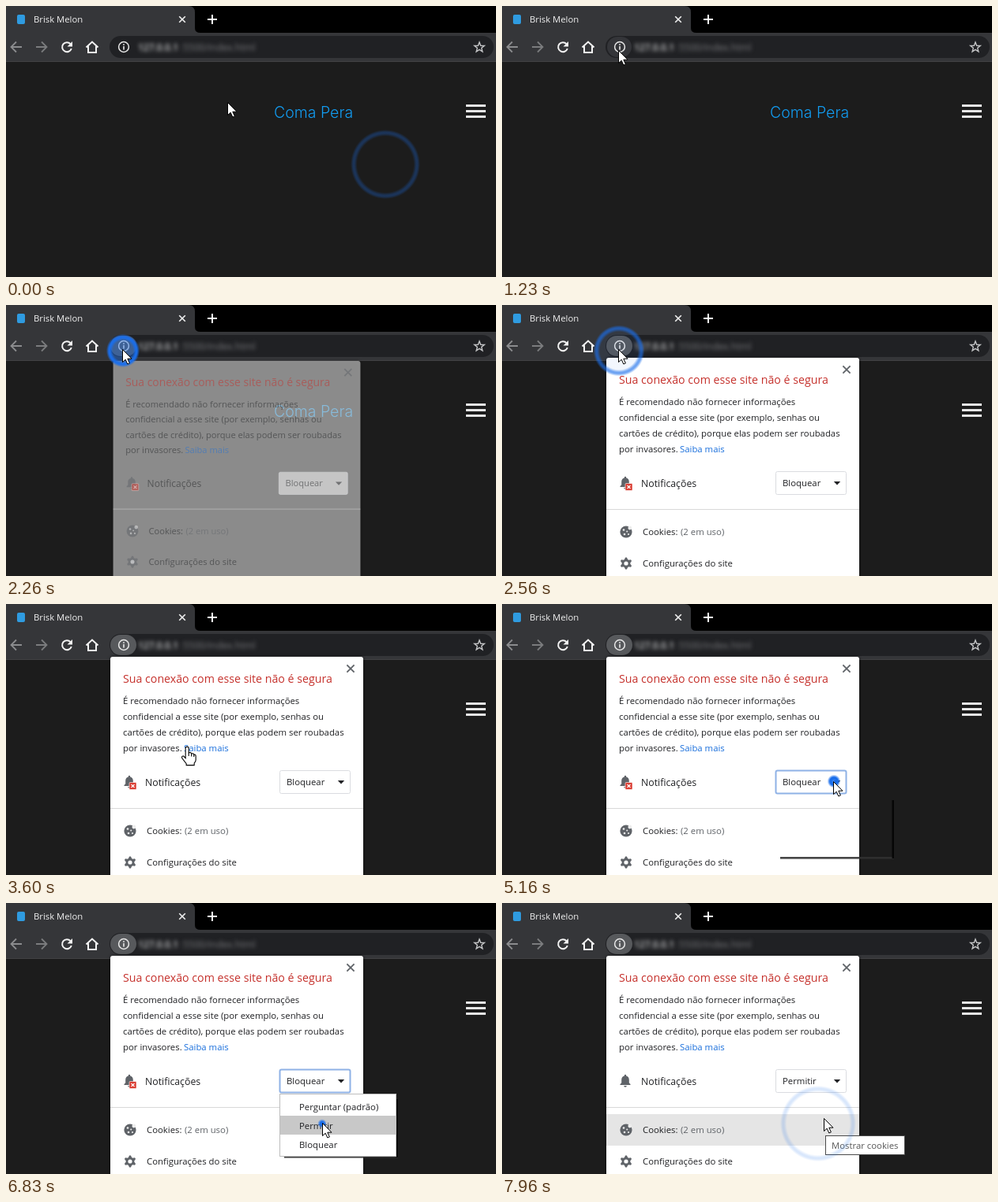
An HTML page with a canvas that plays this animation: 620x344 px, repeating every 8 s.

```html
<!DOCTYPE html>
<html lang="pt">
<head>
<meta charset="utf-8">
<title>Site permissions</title>
<style>
html, body { margin: 0; width: 620px; height: 344px; overflow: hidden; background: #1c1c1c; }
canvas { display: block; }
</style>
</head>
<body>
<canvas id="stage" width="620" height="344"></canvas>
<script>
const ctx = document.getElementById('stage').getContext('2d');
const LOOP = 8000, TAU = Math.PI * 2;
const UI = '"Open Sans", "Noto Sans", sans-serif';
const GREY = '#5f6368', INK = '#202124', BAR = '#353639';

// Pointer tip: time, x, y
const PATH = [
  [0, 280, 122], [100, 278, 121], [350, 240, 104], [600, 190, 76], [860, 157, 61],
  [1060, 148, 57], [1230, 147, 56], [2850, 147, 56], [3150, 172, 98], [3480, 212, 161],
  [3600, 229, 181], [3900, 275, 205], [4300, 341, 222], [4700, 407, 225], [4900, 419, 225],
  [5750, 419, 225], [6000, 412, 245], [6250, 402, 274], [6360, 400, 279],
  [7050, 400, 279], [7400, 407, 273], [LOOP, 407, 273]
];
const CLICKS = [[-1040, 480, 201], [1830, 148, 58], [5070, 420, 225], [6810, 400, 280]];
const POPUP = 2160, MENU = 5150, CHOICE = 6960, TOOLTIP = 7800;

const clamp = v => Math.max(0, Math.min(1, v));
const ramp = (t, start, length) => clamp((t - start) / length);

function pointer(t) {
  const i = PATH.findIndex(p => p[0] > t);
  const [t0, x0, y0] = PATH[i - 1], [t1, x1, y1] = PATH[i];
  const k = (t - t0) / (t1 - t0);
  return [x0 + (x1 - x0) * k, y0 + (y1 - y0) * k];
}

function text(str, x, y, size = 11.35, color = INK, weight = 400, family = UI) {
  ctx.font = `${weight} ${size}px ${family}`;
  ctx.fillStyle = color;
  ctx.fillText(str, x, y);
}

function rect(x, y, w, h, color) {
  ctx.fillStyle = color;
  ctx.fillRect(x, y, w, h);
}

function round(x, y, w, h, r, fill, stroke, width = 1) {
  ctx.beginPath();
  ctx.roundRect(x, y, w, h, r);
  paint(undefined, fill, stroke, width);
}

function paint(path, fill, stroke, width) {
  const args = path ? [path] : [];
  if (fill) { ctx.fillStyle = fill; ctx.fill(...args); }
  if (stroke) { ctx.strokeStyle = stroke; ctx.lineWidth = width; ctx.stroke(...args); }
}

function shape(x, y, d, fill, stroke, width = 1) {
  ctx.save();
  ctx.translate(x, y);
  paint(new Path2D(d), fill, stroke, width);
  ctx.restore();
}

function disc(x, y, r, fill, stroke, width) {
  ctx.beginPath();
  ctx.arc(x, y, r, 0, TAU);
  paint(undefined, fill, stroke, width);
}

// Closed radial outline; radius is chosen by vertex index
function radial(n, radius, turn = -Math.PI / 2) {
  let d = '';
  for (let i = 0; i < n; i++) {
    const a = turn + i * TAU / n, r = radius(i);
    d += `${i ? 'L' : 'M'}${r * Math.cos(a)} ${r * Math.sin(a)}`;
  }
  return d + 'Z';
}

const STAR = radial(10, i => i % 2 ? 2.8 : 6.6);
const GEAR = radial(24, i => i % 4 < 2 ? 7.6 : 5.4, -Math.PI / 2 - TAU / 48);
const cross = r => `M${-r} ${-r}L${r} ${r}M${r} ${-r}L${-r} ${r}`;

function browser(t, x) {
  rect(0, 0, 620, 344, '#1c1c1c');
  rect(0, 0, 620, 35, '#000');
  rect(0, 34, 620, 36, BAR);
  rect(0, 70, 620, 1, '#424244');
  shape(0, 0, 'M0 0H231Q239 0 239 8V28Q239 34 246 34H0Z', BAR);

  round(14, 11, 10, 12, 2, '#2f9be0');
  text('Brisk Melon', 35, 21, 11.3, '#f1f1f1');
  shape(223, 17, cross(3.8), null, '#f1f1f1', 1.6);
  shape(261, 17, 'M-6 0H6M0 -6V6', null, '#fff', 2);

  const arrow = 'M7 0H-6M0 -6.5L-6.5 0L0 6.5';
  shape(13, 52, arrow, null, '#8b8c8e', 1.8);
  ctx.save();
  ctx.scale(-1, 1);
  shape(-45, 52, arrow, null, '#7b7c7e', 1.8);
  ctx.restore();
  shape(77, 52, 'M4.6 -3.8A6 6 0 1 0 5.8 2', null, '#f4f4f4', 2);
  shape(77, 52, 'M7 -7V-.5H.5Z', '#f4f4f4');
  shape(109, 52, 'M-7.5 .5L0 -6.5L7.5 .5M-5 -1V7H5V-1', null, '#f4f4f4', 2);

  round(131, 38, 486, 28, 14, '#202124');
  if (t >= POPUP) round(132, 39, 33, 26, 13, '#57595c');
  else if (t > 800 && x < 165) round(133, 39, 31, 26, 13, '#343539');
  disc(149, 52, 6.4, null, '#e8e8e8', 1.5);
  rect(148.2, 51, 1.6, 4.6, '#e8e8e8');
  rect(148.2, 48.2, 1.6, 1.7, '#e8e8e8');
  ctx.save();
  ctx.filter = 'blur(2.4px)';
  text('127.0.0.1', 167, 57, 12, '#c9cacb', 600);
  text(':5500/index.html', 221, 57, 12, '#77787b');
  ctx.restore();
  shape(599, 52.5, STAR, null, '#c4c5c7', 1.4);

  text('Coma Pera', 339, 142, 19.5, '#129df3', 300, 'Inter, "Open Sans", sans-serif');
  for (let i = 0; i < 3; i++) rect(582, 125 + i * 7, 25, 3, '#e6e6e6');
}

function bell(blocked) {
  shape(156, 226, 'M-6.5 5V4L-4.8 2.2V-1.6C-4.8 -4.4 -3.2 -6 -1.2 -6.4V-7A1.2 1.2 0 0 1 1.2 -7V-6.4'
    + 'C3.2 -6 4.8 -4.4 4.8 -1.6V2.2L6.5 4V5ZM-1.8 6H1.8A1.8 1.8 0 0 1 -1.8 6Z', GREY);
  if (!blocked) return;
  round(156, 226.5, 9, 9, 1, '#d93a2f', '#fff', .6);
  shape(160.5, 231, cross(2), null, '#fff', 1.2);
}

function popup(t, x, y) {
  const p = ramp(t, POPUP, 200);
  if (!p) return;
  const scale = .955 + .045 * p;
  const chosen = t >= CHOICE;
  ctx.save();
  ctx.globalAlpha = p;
  ctx.translate(292, 241);
  ctx.scale(scale, scale);
  ctx.translate(-292, -241);

  ctx.save();
  ctx.shadowColor = 'rgba(0,0,0,.5)';
  ctx.shadowBlur = 5;
  round(132, 67, 320, 348, 3, '#fff');
  ctx.restore();
  shape(436, 82, cross(4.6), null, GREY, 1.8);
  text('Sua conexão com esse site não é segura', 148, 100, 14.2, '#c5302b');
  text('É recomendado não fornecer informações', 148, 127);
  text('confidencial a esse site (por exemplo, senhas ou', 148, 147);
  text('cartões de crédito), porque elas podem ser roubadas', 148, 167);
  text('por invasores.', 148, 187);
  text('Saiba mais', 225, 187, 11.35, '#1a6fdc');

  bell(!chosen);
  text('Notificações', 176, 231, 12.3);
  const focus = t >= 5090 && !chosen;
  round(346.5, 211.5, 89, 29, 2, '#fff', focus ? '#8fb2e6' : '#dadce0', focus ? 2 : 1);
  text(chosen ? 'Permitir' : 'Bloquear', 355, 230);
  shape(424, 226, 'M-4.2 -2H4.2L0 2.4Z', INK);

  rect(132, 259, 320, 1, '#d8d8d8');
  if (chosen && y >= 268) rect(132, 268, 320, 40, '#e5e5e5');
  disc(157, 288, 7.6, GREY);
  for (const [dx, dy, r] of [[-3, -2.5, 1.3], [-2, 3, 1.3], [3, 3, 1.1], [1.2, -.6, 1], [4.8, -5, 2.4]])
    disc(157 + dx, 288 + dy, r, '#eee');
  text('Cookies:', 178, 292);
  text('(2 em uso)', 226, 292, 11.35, GREY);
  shape(157, 328, GEAR, GREY);
  disc(157, 328, 2.6, '#fff');
  text('Configurações do site', 178, 332);
  ctx.restore();
}

function menu(t, y) {
  if (t < MENU || t >= CHOICE) return;
  ctx.save();
  ctx.filter = 'blur(.6px)';
  rect(352, 321, 144, 2.6, 'rgba(50,50,50,.9)');
  rect(493.5, 249, 2.5, 74, 'rgba(5,5,5,.9)');
  ctx.restore();

  ctx.save();
  ctx.globalAlpha = ramp(t, 5165, 150);
  rect(346, 242, 148, 80, '#bdbdbd');
  rect(347, 243, 146, 78, '#fff');
  const row = y < 246 ? 2 : Math.min(2, Math.floor((y - 246) / 24));
  rect(347, 246 + row * 24, 146, 24, '#c8c8c8');
  ['Perguntar (padrão)', 'Permitir', 'Bloquear'].forEach((s, i) => text(s, 371, 263 + i * 24));
  ctx.restore();
}

function tooltip(t) {
  if (t < TOOLTIP) return;
  rect(409, 295, 101, 25, '#4a4a4a');
  rect(410, 296, 99, 23, '#fff');
  text('Mostrar cookies', 417, 312, 11.35, '#575757');
}

function ripple(t, [start, x, y]) {
  const dt = t - start;
  if (dt < 0 || dt > 1300) return;
  const r = 5 + .0375 * dt;
  const alpha = clamp((1300 - dt) / 900);
  const hole = alpha * Math.max(0, .9 - dt / 900);
  const fill = ctx.createRadialGradient(x, y, 0, x, y, r);
  const stop = (inset, a) => fill.addColorStop(clamp(1 - inset / r), `rgba(26,110,235,${a})`);
  stop(r, hole);
  stop(8.5, hole);
  stop(5, alpha);
  stop(3.2, alpha);
  stop(0, 0);
  disc(x, y, r, fill);
}

function cursor(x, y) {
  const onLink = x > 225 && x < 282 && y > 176 && y < 191;
  if (onLink)
    shape(x, y, 'M-2 2A2 2 0 0 1 2 2V8Q4.5 6.5 5.5 9Q8 7.8 8.6 10.2Q11 9.5 11 12V17Q11 19 9 21V23.5H-1V21.5'
      + 'L-6.5 14.5Q-7 11.5 -4.5 12L-2 14.5ZM2 8V12M5.5 9V12.5M8.6 10.2V13', '#fff', '#000', 1.1);
  else
    shape(x, y, 'M.5 .5V16.6L4.2 13.2L6.8 19L9.4 17.9L6.8 12.2H12Z', '#fff', '#000', 1);
}

function draw(t) {
  const [x, y] = pointer(t);
  browser(t, x);
  popup(t, x, y);
  menu(t, y);
  tooltip(t);
  CLICKS.forEach(c => ripple(t, c));
  cursor(x, y);
}

const began = performance.now();
function frame() {
  draw((performance.now() - began) % LOOP);
  requestAnimationFrame(frame);
}
frame();
</script>
</body>
</html>
```
